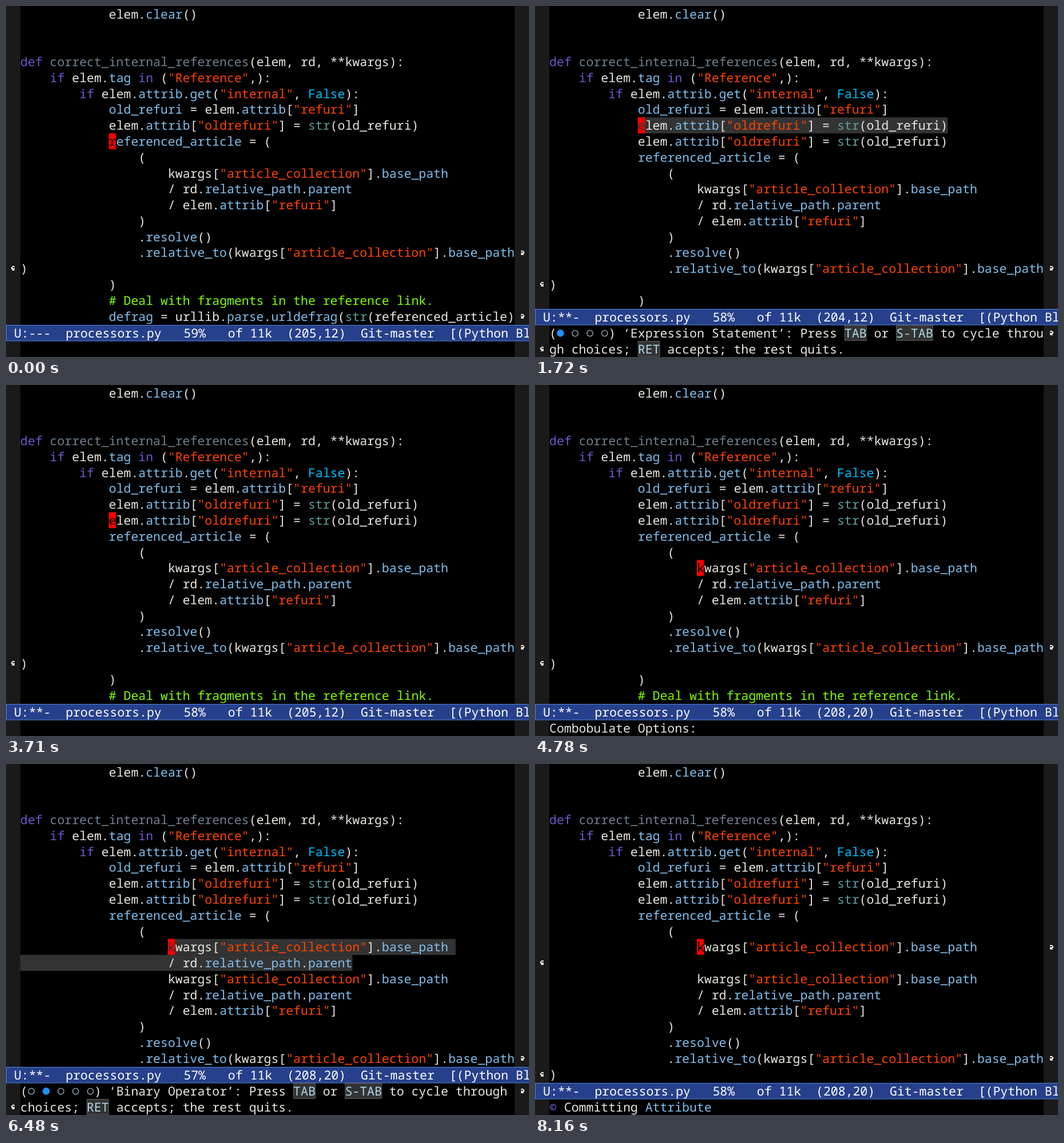
These frames come from a looping animation (914 by 613 pixels, 9650 ms). An HTML page:

```html
<!DOCTYPE html>
<html lang="en">
<head>
<meta charset="utf-8">
<title>Editor: cloning syntax nodes</title>
<style>
  html, body { margin: 0; width: 914px; height: 613px; overflow: hidden; background: #000; }
  svg { display: block; }
  text {
    font: 21.49px "Noto Sans Mono", "DejaVu Sans Mono", monospace;
    font-variant-ligatures: none;
    text-rendering: geometricPrecision;
  }
</style>
</head>
<body>
<svg id="stage" width="914" height="613" viewBox="0 0 914 613"></svg>
<script>
const WIDTH = 914, HEIGHT = 613, FRINGE = 25, COLS = 67;
const CELL = 12.895, ROW = 27.78, ECHO_ROW = 27.9, BASELINE = 21.7;
const FIRST_LINE = 197, LOOP = 9650;
const C = {
  text: '#ebe7e1', keyword: '#6a5acd', func: '#708090', name: '#82c0ee', string: '#ff4500',
  constant: '#00bfff', builtin: '#5f9ea0', remark: '#7fff00', region: '#333333', key: '#add8e6',
};

// In the code lines "@" stands for a stem that recurs in many words.
const STEM = 're' + 'f';
const head = [
  '            elem.clear()', '', '',
  'def correct_internal_@erences(elem, rd, **kwargs):',
  '    if elem.tag in ("@erence",):'.replace('"@', '"R' + STEM.slice(1)),
  '        if elem.attrib.get("internal", False):',
  '            old_@uri = elem.attrib["@uri"]',
];
const assign = '            elem.attrib["old@uri"] = str(old_@uri)';
const open = ['            @erenced_article = (', '                ('];
const indent = ' '.repeat(20);
const operands = ['kwargs["article_collection"].base_path', '/ rd.relative_path.parent', '/ elem.attrib["@uri"]']
  .map(s => indent + s);
const tail = [
  '                )',
  '                .resolve()',
  '                .relative_to(kwargs["article_collection"].base_path)',
  '            )',
  '            # Deal with fragments in the @erence link.',
  '            defrag = urllib.parse.urldefrag(str(@erenced_article))',
];

// The first operands are repeated; a partial clone leaves trailing indentation.
function buffer(assigns, clones) {
  const cloned = operands.slice(0, clones);
  if (clones && clones < 3) cloned[clones - 1] += indent;
  return [...head, ...Array(assigns).fill(assign), ...open, ...cloned, ...operands, ...tail]
    .map(line => line.replaceAll('@', STEM));
}

const choices = (count, active, node) =>
  `(${Array.from({ length: count }, (_, i) => i === active ? '●' : '○').join(' ')}) ‘${node}’: ` +
  'Press TAB or S-TAB to cycle through choices; RET accepts; the rest quits.';
const prompt = 'Combobulate Options:';

// region: number of highlighted lines, starting at the cursor
const state = (time, line, col, echo = '', { assigns = 2, clones = 0, region = 0, percent = 58 } = {}) =>
  ({ time, line, col, echo, assigns, clones, region, percent });
const states = [
  state(0, 205, 12, '', { assigns: 1, percent: 59 }),
  state(1000, 204, 12, prompt, { assigns: 1, percent: 59 }),
  state(1720, 204, 12, choices(4, 0, 'Expression Statement'), { region: 1 }),
  state(2580, 204, 12, '© Committing Expression Statement'),
  state(3710, 205, 12),
  state(3900, 206, 12),
  state(4220, 207, 16),
  state(4450, 208, 20),
  state(4780, 208, 20, prompt),
  state(5640, 208, 20, choices(5, 0, 'Binary Operator'), { clones: 3, region: 3, percent: 57 }),
  state(6480, 208, 20, choices(5, 1, 'Binary Operator'), { clones: 2, region: 2, percent: 57 }),
  state(7190, 208, 20, choices(5, 2, 'Attribute'), { clones: 1, region: 1 }),
  state(8160, 208, 20, '© Committing Attribute', { clones: 1 }),
];

const colX = col => FRINGE + col * CELL;
const rect = (x, y, w, h, fill, extra = '') =>
  `<rect x="${x}" y="${y}" width="${w}" height="${h}" fill="${fill}" ${extra}/>`;
const label = (str, x, y, fill, weight = 400) =>
  `<text x="${x}" y="${y + BASELINE}" fill="${fill}" font-weight="${weight}">${str}</text>`;

// Places each word on the character grid, wrapping at the window edge.
function put(str, col, top, rowHeight, fill) {
  let out = '';
  for (const match of str.matchAll(/\S+/g)) {
    let word = match[0], at = col + match.index;
    while (word) {
      const part = word.slice(0, COLS - at % COLS);
      out += label(part, colX(at % COLS), top + Math.floor(at / COLS) * rowHeight, fill);
      word = word.slice(part.length);
      at += part.length;
    }
  }
  return out;
}

const curl = (x, y, flip) =>
  `<path transform="translate(${x} ${Math.round(y)}) scale(${flip} 1)" stroke="${C.text}" shape-rendering="crispEdges"
    d="M2 .5h4M2 1.5h5M6 2.5h2M2 3.5h1M5 3.5h3M2 4.5h6M2 5.5h5M2 6.5h4M2 7.5h5"/>`;
const wrapMarks = (top, rowHeight, wraps) => Array.from({ length: wraps }, (_, i) =>
  curl(898, top + i * rowHeight + 10, 1) + curl(17, top + (i + 1) * rowHeight + 10, -1)).join('');
const rowCount = str => Math.max(1, Math.ceil(str.length / COLS));

const syntax = /(#.*)|("[^"]*")|\b(def|if|in)\b|\b(False)\b|\b(str)\b|(\bcorrect_\w+)|((?<=\.)\w+|\w+(?= = ))|\w+|\W/g;
const groups = ['remark', 'string', 'keyword', 'constant', 'builtin', 'func', 'name'];

function codeLine(line, top) {
  let out = '';
  for (const match of line.matchAll(syntax)) {
    const kind = groups.find((_, i) => match[i + 1]) || 'text';
    out += put(match[0], match.index, top, ROW, C[kind]);
  }
  return out + wrapMarks(top, ROW, rowCount(line) - 1);
}

function body(s, rows) {
  const lines = buffer(s.assigns, s.clones);
  const cursorRow = s.line - FIRST_LINE;
  let out = '';
  for (let i = 0; i < s.region; i++) {
    const from = i ? 0 : s.col, newline = i < s.region - 1 ? 1 : 0;
    const to = lines[cursorRow + i].trimEnd().length + newline;
    out += rect(colX(from), (cursorRow + i) * ROW, (to - from) * CELL, ROW + .2, C.region);
  }
  let row = 0;
  for (const line of lines) {
    out += codeLine(line, row * ROW);
    row += rowCount(line);
    if (row >= rows) break;
  }
  const x = colX(s.col), y = cursorRow * ROW;
  return out + rect(x, y, 12.2, ROW, '#ff0000') +
    label(lines[cursorRow][s.col], x, y, s.region ? C.region : '#000');
}

function modeLine(s, top) {
  const status = s.assigns > 1 ? '**-' : '---';
  const str = ` U:${status}  processors.py   ${s.percent}%   of 11k  (${s.line},${s.col})  Git-master  [(Python Bl`;
  let out = rect(0, top, WIDTH, HEIGHT - top, '#000') +
    rect(.5, top + .5, WIDTH, 27.5, '#27408b', 'stroke="#5585dc"');
  for (const { 0: word, index } of str.matchAll(/\S+/g))
    out += label(word, 1 + index * CELL, top + .3, '#fff', word.endsWith('.py') ? 700 : 400);
  return out;
}

function echoArea(str, top) {
  let out = '';
  for (const { 0: token, index } of str.matchAll(/S-TAB|TAB|RET|[●○©]|(?<=Committing ).+|./g)) {
    const x = colX(index % COLS), y = top + Math.floor(index / COLS) * ECHO_ROW;
    if (token === '●') {
      out += `<circle cx="${x + CELL / 2}" cy="${y + 14.2}" r="6.3" fill="#1e90ff"/>`;
    } else if (token === '○') {
      out += `<circle cx="${x + CELL / 2}" cy="${y + 14.4}" r="5.2" fill="none" stroke="#9fb4c4" stroke-width="1.3"/>`;
    } else {
      const isKey = /TAB|RET/.test(token);
      if (isKey) out += rect(x + .5, y + .5, token.length * CELL - 1, ECHO_ROW - 1.5, C.region, 'stroke="#666"');
      const fill = isKey ? C.key : token === '©' ? '#7b68ee' : token.length > 1 ? C.name : C.text;
      out += put(token, index, top, ECHO_ROW, fill);
    }
  }
  return out + wrapMarks(top, ECHO_ROW, rowCount(str) - 1);
}

function render(s) {
  const echoRows = rowCount(s.echo);
  const echoTop = HEIGHT - echoRows * ECHO_ROW, modeTop = Math.round(echoTop - 28);
  const fringes = (y, h) => rect(0, y, FRINGE, h, '#1a1a1a') + rect(889, y, FRINGE, h, '#1a1a1a');
  return fringes(0, HEIGHT) + body(s, 21 - echoRows) + modeLine(s, modeTop) +
    fringes(modeTop + 29, HEIGHT) + echoArea(s.echo, echoTop);
}

const stage = document.getElementById('stage');
const start = performance.now();
let shown;
function tick() {
  const time = (performance.now() - start) % LOOP;
  const current = states.findLast(s => s.time <= time);
  if (current !== shown) stage.innerHTML = render(shown = current);
  requestAnimationFrame(tick);
}
tick();
</script>
</body>
</html>
```
